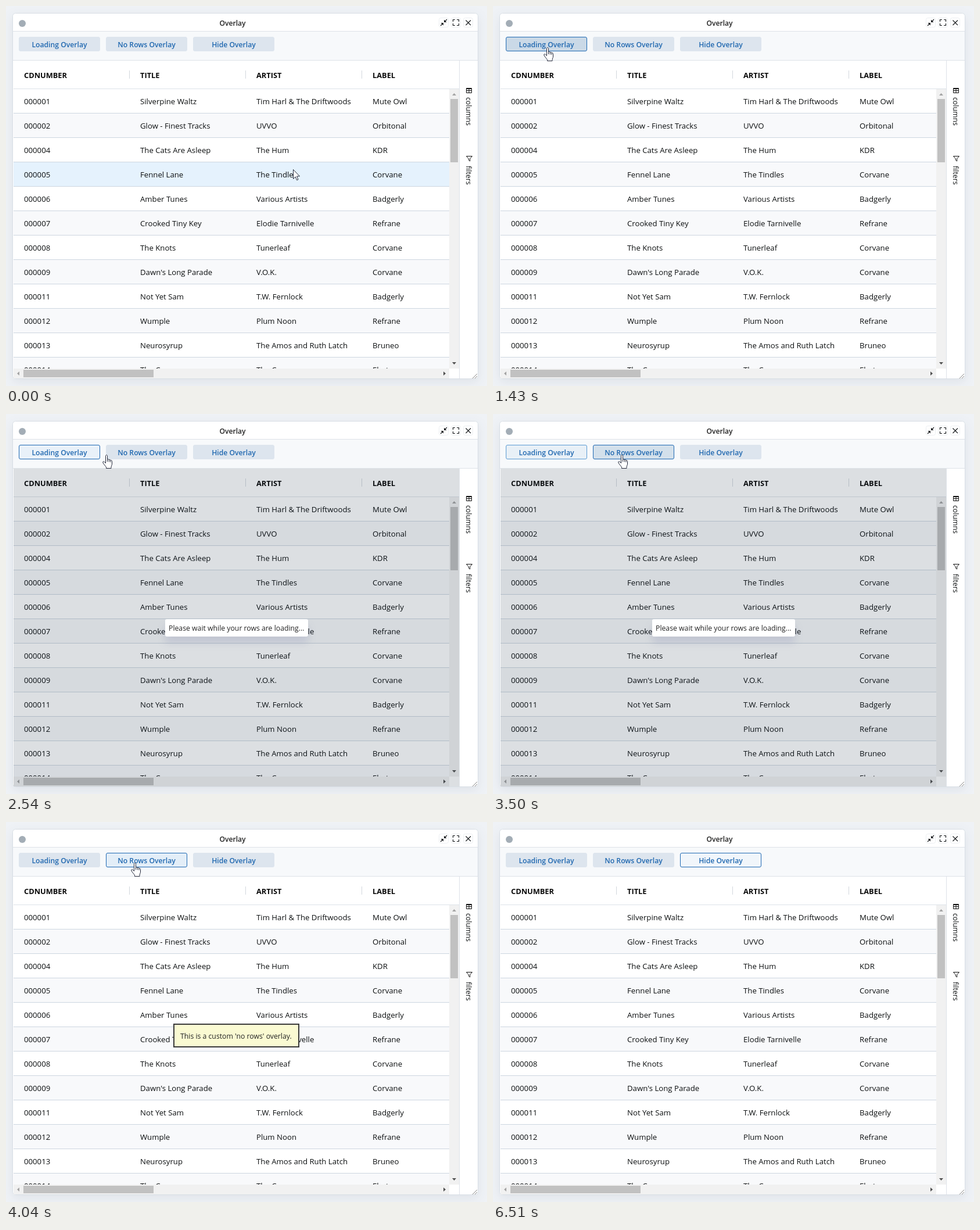
These frames come from a looping animation (828 by 654 pixels, 7.08 s). An HTML page:

```html
<!DOCTYPE html>
<html lang="en">
<head>
<meta charset="utf-8">
<title>Overlay</title>
<style>
  html, body { margin: 0; width: 100%; height: 100%; overflow: hidden; background: #eff2f6; }
  svg { display: block; }
  text { font: 13.2px "Open Sans", "Noto Sans", sans-serif; fill: #0c0f10; white-space: pre; }
  .window { fill: #fff; stroke: #d8dee5; filter: drop-shadow(0 5px 9px rgba(40, 55, 75, .08)); }
  .line { fill: #dde2e8; }
  .head { font-size: 12.8px; font-weight: 700; fill: #0a0a0a; }
  .title { font-size: 12.1px; font-weight: 600; fill: #222; text-anchor: middle; }
  .label { font-size: 12.2px; font-weight: 600; fill: #2068b0; text-anchor: middle; }
  .small { font-size: 12.25px; fill: #222; }
  .side { font-size: 12.3px; }
  .track { fill: #f1f1f1; }
  .thumb { fill: #c1c1c1; }
  .off { fill: #a3a3a3; }
  .on { fill: #505050; }
  .icon { fill: none; stroke: #1c1f22; stroke-width: 1.2; }
  .crisp { fill: none; stroke: #111; }
  .grip { stroke: #666; stroke-width: .8; }
  .chip { fill: #fff; stroke: #eceff2; }
  .message { fill: #fff; filter: drop-shadow(0 11px 7px rgba(60, 65, 120, .13)); }
  .pointer { fill: #fff; stroke: #23283a; stroke-linejoin: round; }
  #loading, #empty, #hand { opacity: 0; }
</style>
</head>
<body>
<svg id="stage" width="828" height="654" viewBox="0 0 828 654">
  <rect class="window" x="11.5" y="12.5" width="801" height="629" rx="5"/>
  <circle cx="28" cy="30" r="6" fill="#a3adb6"/>
  <text class="title" x="390" y="34">Overlay</text>

  <rect class="chip" x="745.5" y="20.5" width="16" height="16" rx="3"/>
  <rect class="chip" x="766.5" y="20.5" width="16" height="16" rx="3"/>
  <rect class="chip" x="787.5" y="20.5" width="16" height="16" rx="3"/>
  <path class="icon" d="M759 23L755 27M748 34L752 30"/>
  <path fill="#1c1f22" d="M754 23.5V28H758.5ZM748.5 29H753V33.5Z"/>
  <path class="icon" d="M769.5 27V23.5H773M776 23.5H779.5V27M779.5 30V33.5H776M773 33.5H769.5V30"/>
  <path class="icon" d="M791.5 24.5L800 33M800 24.5L791.5 33"/>

  <rect x="12" y="44" width="800" height="49" fill="#f7f9fb"/>
  <rect class="line" x="12" y="43" width="800" height="1"/>
  <g id="buttons"></g>

  <rect class="line" x="12" y="93" width="800" height="1"/>
  <g id="header"></g>
  <rect class="line" x="13" y="142" width="767" height="1"/>

  <svg x="13" y="143" width="750" height="481">
    <g id="stripes"></g>
    <rect id="hover" width="750" height="41" fill="#e5f2fd"/>
    <g id="cells"></g>
  </svg>

  <rect class="track" x="763" y="143" width="17" height="481"/>
  <rect class="thumb" x="765" y="160" width="13" height="109"/>
  <path class="off" d="M768 154H775L771.5 150Z"/>
  <path class="on" d="M768 613H775L771.5 617Z"/>
  <rect class="track" x="13" y="624" width="750" height="17"/>
  <rect class="thumb" x="30" y="626" width="224" height="13"/>
  <path class="off" d="M23 629V636L19 632.5Z"/>
  <path class="on" d="M753 629V636L757 632.5Z"/>

  <rect class="line" x="780" y="94" width="1" height="547"/>
  <path class="crisp" d="M792.5 141.5H801.5V149.5H792.5ZM792 142.5H802M792 145.5H802M797 142V150"/>
  <text class="side" transform="translate(792 157) rotate(90)">columns</text>
  <path class="crisp" d="M792.5 258.5H802.5L798.7 262.8V267L796.3 265.2V262.8Z"/>
  <text class="side" transform="translate(792 275) rotate(90)">filters</text>
  <path class="grip" d="M803 641L811 633M807 641L811 637"/>

  <g id="loading">
    <rect x="13" y="94" width="767" height="547" fill="rgb(20, 40, 60)" fill-opacity=".15"/>
    <rect class="message" x="274" y="353" width="246" height="30" rx="3"/>
    <text class="small" x="280" y="373">Please wait while your rows are loading...</text>
  </g>
  <g id="empty">
    <rect x="289" y="348" width="215" height="39" fill="#fafad2" stroke="#3a3a3a" stroke-width="2"/>
    <text class="small" x="300" y="373">This is a custom 'no rows' overlay.</text>
  </g>

  <g id="arrow" class="pointer">
    <path d="M.5 .5V16.5L4.2 13L6.6 18.7L9 17.7L6.6 12H11.5Z"/>
  </g>
  <g id="hand" class="pointer">
    <path d="M-1.5 14V2.2C-1.5 0 1.5 0 1.5 2.2V8.5C2 7.3 4 7.5 4.3 9C5 8 6.8 8.3 7 10C8 9.2 9.5 9.8 9.5 11.5V16C9.5 18 8 19.5 8 21.5V23.5H-.5V21.5C-2 19 -4.5 17 -6 14C-7 12 -5 11 -3.7 12.3L-1.5 14.5Z"/>
    <path fill="none" d="M1.5 8.5V12M4.3 9V12.5M7 10V13"/>
  </g>
</svg>

<script>
const LOOP = 7080, ROW = 42, TOP = 143;
const $ = id => document.getElementById(id);

function add(parent, tag, attrs, text = '') {
  const el = document.createElementNS('http://www.w3.org/2000/svg', tag);
  for (const name in attrs) el.setAttribute(name, attrs[name]);
  el.textContent = text;
  parent.append(el);
  return el;
}

// frames: [time, style] pairs; the last style holds until the loop ends
function play(el, frames, easing = 'linear') {
  const last = frames[frames.length - 1][1];
  const keys = [...frames, [LOOP, last]].map(([t, style]) => ({ offset: t / LOOP, easing, ...style }));
  el.animate(keys, { duration: LOOP, iterations: Infinity });
}
const jump = (el, frames) => play(el, frames, 'steps(1, end)');

// Grid
['CDNUMBER', 'TITLE', 'ARTIST', 'LABEL'].forEach((name, i) => {
  add($('header'), 'text', { class: 'head', x: 31 + i * 200, y: 124 }, name);
  if (i) add($('header'), 'rect', { x: 12 + i * 200, y: 111, width: 1, height: 14, fill: '#d3d8dd' });
});

const rows = `
000001|Silverpine Waltz|Tim Harl & The Driftwoods|Mute Owl
000002|Glow - Finest Tracks|UVVO|Orbitonal
000004|The Cats Are Asleep|The Hum|KDR
000005|Fennel Lane|The Tindles|Corvane
000006|Amber Tunes|Various Artists|Badgerly
000007|Crooked Tiny Key|Elodie Tarnivelle|Refrane
000008|The Knots|Tunerleaf|Corvane
000009|Dawn's Long Parade|V.O.K.|Corvane
000011|Not Yet Sam|T.W. Fernlock|Badgerly
000012|Wumple|Plum Noon|Refrane
000013|Neurosyrup|The Amos and Ruth Latch|Bruneo
000014|The Cove|The Coves|Elmtara`.trim().split('\n');

rows.forEach((row, r) => {
  const y = r * ROW;
  add($('stripes'), 'rect', { y, width: 750, height: 41, fill: r % 2 ? '#f8f9fb' : '#fff' });
  add($('stripes'), 'rect', { y: y + 41, width: 750, height: 1, fill: '#cdd6e0' });
  row.split('|').forEach((cell, c) => add($('cells'), 'text', { x: 18 + c * 200, y: y + 26 }, cell));
});

// Toolbar
const PLAIN = '#dde5ee', OVER = '#c9d7e4', FOCUS = '#f1f6fb', BOTH = '#e3eef8', EDGE = '#1f69b3';
const look = (fill, stroke = fill) => ({ fill, stroke });

const buttons = [
  ['Loading Overlay', [
    [0, look(PLAIN)], [1110, look(PLAIN)], [1270, look(OVER)], [1340, look(OVER)],
    [1430, look('#cad9e7', EDGE)], [1580, look('#cfdde9', EDGE)], [2050, look(BOTH, EDGE)],
    [2450, look(BOTH, EDGE)], [2600, look('#edf3f9', EDGE)], [3410, look('#edf3f9', EDGE)],
    [3500, look('#e8f0f7', '#5a9bd3')], [3650, look(PLAIN)]]],
  ['No Rows Overlay', [
    [0, look(PLAIN)], [2530, look(PLAIN)], [2690, look(OVER)], [3400, look(OVER)],
    [3420, look('#cedbe8', EDGE)], [3500, look('#d3e0eb', EDGE)], [3900, look(BOTH, EDGE)],
    [4690, look(BOTH, EDGE)], [4850, look(FOCUS, EDGE)], [5160, look(FOCUS, EDGE)],
    [5320, look(PLAIN)]]],
  ['Hide Overlay', [
    [0, look(PLAIN)], [4760, look(PLAIN)], [4920, look(OVER)], [5160, look(OVER)],
    [5170, look(OVER, EDGE)], [5330, look('#cad8e5', EDGE)], [5700, look(BOTH, EDGE)],
    [6110, look(BOTH, EDGE)], [6300, look(FOCUS, EDGE)]]],
];
buttons.forEach(([name, frames], i) => {
  const x = 22 + i * 150;
  const box = add($('buttons'), 'rect', { x: x + .5, y: 53.5, width: 139, height: 24, rx: 2.5, fill: PLAIN });
  add($('buttons'), 'text', { class: 'label', x: x + 70, y: 71 }, name);
  play(box, frames);
});

// Overlays
const show = (on, off) => [[0, { opacity: 0 }], [on, { opacity: 1 }], [off, { opacity: 0 }]];
jump($('loading'), show(1500, 3570));
jump($('empty'), show(3570, 5330));

// Pointer: stepped moves, from which its shape and the lit row follow
const path = [[0, 494, 281]];
function glide(start, end, steps, x, y) {
  const [, x0, y0] = path[path.length - 1];
  for (let i = 1; i <= steps; i++) {
    const t = start + (end - start) * (i - 1) / (steps - 1);
    const p = Math.sin(i / steps * Math.PI / 2) ** 1.38;
    path.push([Math.floor(t / 10) * 10, Math.round(x0 + (x - x0) * p), Math.round(y0 + (y - y0) * p)]);
  }
}
glide(330, 1030, 10, 94, 85);
path.push([1110, 94, 71]);
glide(2210, 2920, 10, 222, 70);
glide(4610, 4920, 5, 370, 62);
glide(6030, 6430, 6, 402, 13);

const onButton = (x, y) => y >= 53 && y < 78 && x >= 22 && x < 462 && (x - 22) % 150 < 140;
const pointer = wanted => [
  ...path.map(([t, x, y]) => [t, {
    transform: `translate(${x}px, ${y}px)`,
    opacity: onButton(x, y) === wanted ? 1 : 0,
  }]),
  [6510, { transform: 'translate(402px, 13px)', opacity: 0 }],
];
jump($('arrow'), pointer(false));
jump($('hand'), pointer(true));
jump($('hover'), path.map(([t, , y]) => [t, {
  transform: `translate(0, ${Math.max(0, Math.floor((y - TOP) / ROW)) * ROW}px)`,
  opacity: y >= TOP ? 1 : 0,
}]));
</script>
</body>
</html>
```
